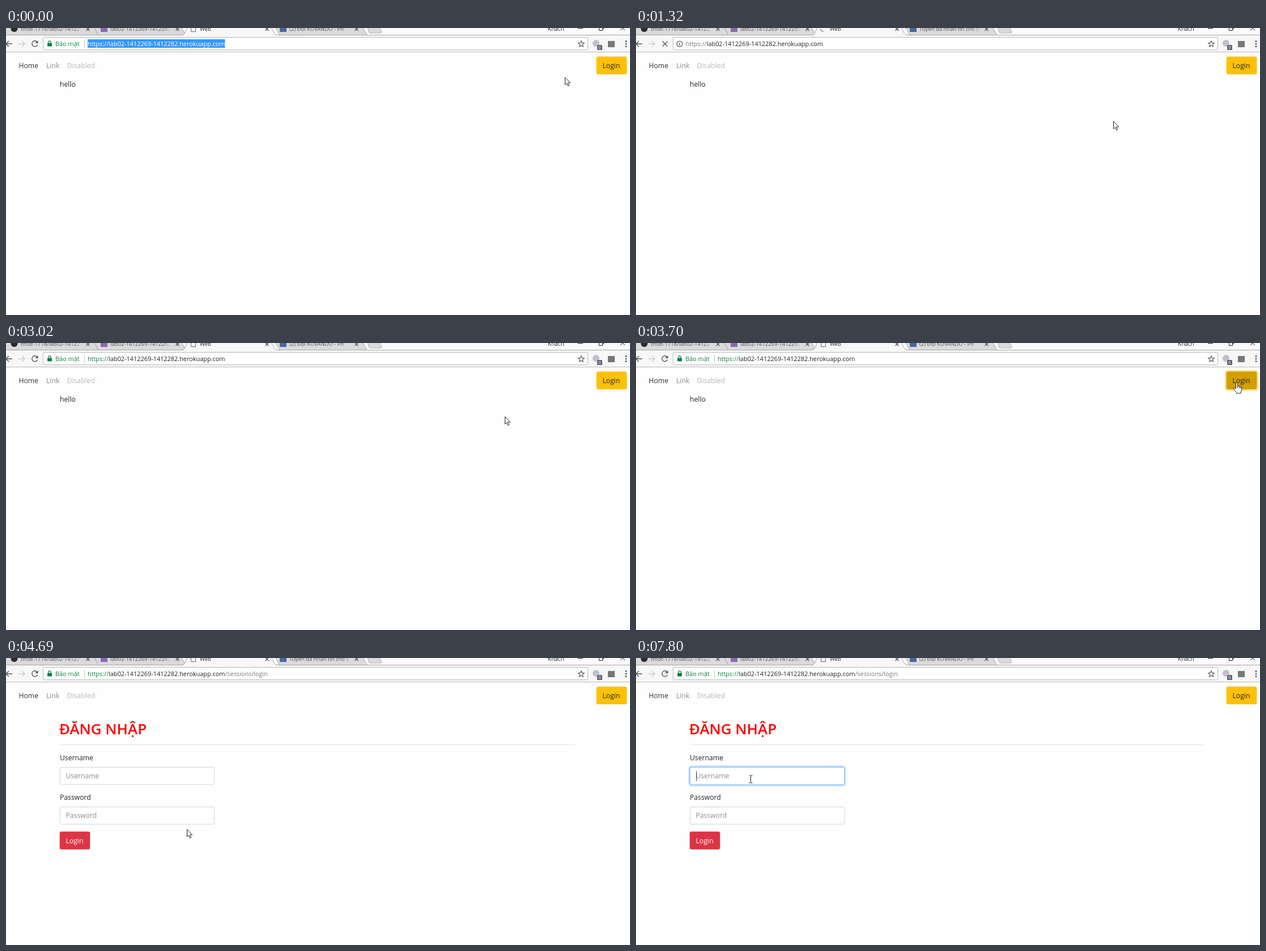
Write an HTML page that moves like this. It is 1101x508 px and loops after 8 s.

```html
<!DOCTYPE html>
<html lang="vi">
<head>
<meta charset="utf-8">
<title>Web</title>
<style>
  html, body { margin: 0; width: 100%; height: 100%; overflow: hidden; background: #fefefe; }
  svg { display: block; width: 1101px; height: 508px; }
  text { font-family: "Open Sans", "Noto Sans", sans-serif; font-size: 12.2px; fill: #212529; white-space: pre; }
  .tab text { font-size: 9.5px; fill: #555; }
  .tab.on text { fill: #222; }
  .bar text { font-size: 10.9px; fill: #222; }
  .bar .green { fill: #0b8043; }
  .bar .grey { fill: #777; }
  .bar .white { fill: #fff; }
  .line { fill: none; stroke: #555; stroke-width: 1.4; }
  .hint { fill: #868e96; }
  .field { fill: #fff; stroke: #ced4da; }
</style>
</head>
<body>
<svg viewBox="0 0 1101 508" xmlns="http://www.w3.org/2000/svg">
  <defs>
    <linearGradient id="fade"><stop stop-color="#dadada" stop-opacity="0"/><stop offset="1" stop-color="#dadada"/></linearGradient>
    <path id="x" d="M-3 -3L3 3M3 -3L-3 3" class="line"/>
    <path id="shape" d="M-8 -9H146L158 12.5H4Z" fill="#dadada" stroke="#a6a6a6"/>
  </defs>
  <rect width="1101" height="508" fill="#fefefe"/>

  <!-- tab strip -->
  <rect width="1101" height="13" fill="#fbfbfb"/>
  <path d="M638 -2H659L663 7Q663.500 9 661 9H643Q641 9 640 7Z" fill="#dadada" stroke="#b4b4b4"/>
  <g class="tab">
    <use href="#shape" x="479"/>
    <rect x="483" y="-5" width="12" height="12" fill="#4a66a0"/>
    <text id="chat" x="500" y="5"></text>
    <rect x="593" y="-4" width="16" height="13" fill="url(#fade)"/>
    <use href="#x" x="618.500" y="2"/>
    <use href="#shape" x="159"/>
    <rect x="167" y="-5" width="12" height="12" fill="#8a68b4"/>
    <text x="184" y="5">lab02-1412269-1412282</text>
    <rect x="276" y="-4" width="16" height="13" fill="url(#fade)"/>
    <use href="#x" x="302.500" y="2"/>
    <use href="#shape" x="5"/>
    <rect y="-5" width="12" height="17" fill="#dadada"/>
    <circle cx="14.500" cy="1" r="6" fill="#2b2b2b"/>
    <text x="26" y="5">tmdt-1718/lab02-14122</text>
    <rect x="120" y="-4" width="16" height="13" fill="url(#fade)"/>
    <use href="#x" x="144.500" y="2"/>
  </g>
  <path d="M0 12.500H1101" stroke="#a6a6a6"/>
  <rect y="13" width="1101" height="30" fill="#f7f7f7"/>
  <g class="tab on">
    <path d="M311 13Q314 12 315.500 9L320 -1H468L473 9Q475 12.500 479 13Z" fill="#f7f7f7"/>
    <path d="M309 12.500Q314 12 315.500 9L320 -1M468 -1L473 9Q475 12.500 480 12.500" fill="none" stroke="#a6a6a6"/>
    <path id="sheet" d="M326.500 -4V6.500H334.500V-4" fill="#fff" stroke="#666"/>
    <path id="spin" d="M-5 0A5 5 0 0 0 1 5" fill="none" stroke="#999" stroke-width="1.500"/>
    <text x="342" y="5">Web</text>
    <use href="#x" x="460.500" y="2"/>
  </g>
  <text x="956" y="5" style="font-size:10px">Khách</text>
  <path d="M1009 .5H1018M1046.500 -4V4.500H1052.500V-4M1052 1.500H1054.500V-3M1084 -4L1092 4M1092 -4L1084 4" fill="none" stroke="#222"/>

  <!-- toolbar -->
  <g class="bar">
    <path d="M0 42.500H1101" stroke="#b9b9b9"/>
    <path d="M11 28H0M5 23L0 28L5 33" class="line"/>
    <path d="M22 28H33M28 23L33 28L28 33" class="line" style="stroke:#ccc"/>
    <g id="reload">
      <path d="M54.800 24.700A5 5 0 1 0 55.500 29.500" class="line"/>
      <path d="M56.500 22V27H51.500Z" fill="#555"/>
    </g>
    <path id="stop" d="M46.500 23.500L55.500 32.500M55.500 23.500L46.500 32.500" class="line"/>
    <rect x="65.500" y="16.500" width="961" height="22" rx="2" fill="#fff" stroke="#b8b8b8"/>
    <g id="secure">
      <rect x="73" y="26.500" width="8" height="6" rx="1" fill="#0b8043"/>
      <path d="M74.800 27V25A2.200 2.200 0 0 1 79.200 25V27" fill="none" stroke="#0b8043" stroke-width="1.200"/>
      <text class="green" x="87" y="32">Bảo mật</text>
      <path d="M138.500 21V35" stroke="#c4c4c4"/>
    </g>
    <g id="info">
      <circle cx="77" cy="28" r="5" class="line" style="stroke-width:1.200"/>
      <path d="M77 27V31M77 24.700V26" stroke="#555" stroke-width="1.300"/>
    </g>
    <rect id="mark" x="144" y="20" width="242.500" height="15" fill="#3399ff"/>
    <text id="url" y="32"><tspan id="scheme">https://</tspan><tspan id="host">lab02-1412269-1412282.herokuapp.com</tspan><tspan id="path" class="grey">/sessions/login</tspan></text>
    <path d="M1015 22.800L1016.500 26.400L1020.300 26.700L1017.400 29.200L1018.300 33L1015 31L1011.700 33L1012.600 29.200L1009.700 26.700L1013.500 26.400Z" fill="none" stroke="#555" stroke-width="1.100"/>
    <circle cx="1041" cy="27" r="6" fill="#c0c0cc"/>
    <rect x="1043" y="30" width="9" height="9" rx="1.500" fill="#5f6475"/>
    <text class="white" x="1045.300" y="37.300" style="font-size:7.500px">0</text>
    <rect x="1062" y="23" width="12" height="11" fill="#777"/>
    <g fill="#555"><circle cx="1094" cy="23.500" r="1.400"/><circle cx="1094" cy="28" r="1.400"/><circle cx="1094" cy="32.500" r="1.400"/></g>
  </g>

  <!-- page -->
  <text x="22.500" y="71" fill-opacity=".95">Home</text>
  <text x="71" y="71" fill-opacity=".55">Link</text>
  <text x="107.500" y="71" fill-opacity=".32">Disabled</text>
  <rect id="glow" x="1040.500" y="49.500" width="56.500" height="34" rx="4" fill="none" stroke="#ffc107" stroke-opacity=".5" stroke-width="2.500"/>
  <rect id="login" x="1041.700" y="50.600" width="53.800" height="31.400" rx="3.200"/>
  <text x="1052.500" y="71">Login</text>
  <text id="hello" x="95" y="104">hello</text>
  <g id="form">
    <text x="94" y="135" style="font-size:25.900px;font-weight:600;fill:#f00">ĐĂNG NHẬP</text>
    <path d="M95 153.500H1004" stroke="#e5e5e5"/>
    <text x="95" y="181">Username</text>
    <rect id="ring" x="93.800" y="191.800" width="275.200" height="34" rx="4.500" fill="none" stroke="#007bff" stroke-opacity=".27" stroke-width="2.600"/>
    <rect id="user" class="field" x="95.300" y="193.400" width="272.300" height="30.500" rx="3"/>
    <text class="hint" x="105.500" y="213">Username</text>
    <rect id="caret" x="106" y="200" width="1" height="18" fill="#495057"/>
    <text x="95" y="251">Password</text>
    <rect class="field" x="95.300" y="263.600" width="272.300" height="30.500" rx="3"/>
    <text class="hint" x="105.500" y="283">Password</text>
    <rect x="94.700" y="307.300" width="53.600" height="31.400" rx="3.200" fill="#dc3545"/>
    <text x="105.500" y="328" style="fill:#fff">Login</text>
  </g>

  <!-- pointers -->
  <g id="pointer" stroke="#222" fill="#fff">
    <path id="arrow" d="M.5 .5V13.500L3.500 10.800L5.600 15.800L7.700 14.900L5.600 10H9.700Z"/>
    <path id="hand" d="M-1.500 10V1.500Q-1.500 0 0 0Q1.500 0 1.500 1.500V6Q3.500 4.800 4.300 6.600Q6 5.800 6.600 7.400Q8.500 7 8.500 9V13Q8.500 15 7 16.500V19H-.5V17.500Q-3.500 14.500 -5.500 11Q-6 9.300 -4.500 9.200Q-3 9.200 -1.500 11.500M1.500 6V10M4.300 6.600V10M6.600 7.400V10"/>
    <path id="beam" d="M-3 -6.500H-1Q0 -6.500 0 -5.500V5.500Q0 6.500 -1 6.500H-3M3 -6.500H1Q0 -6.500 0 -5.500M0 5.500Q0 6.500 1 6.500H3" fill="none"/>
  </g>
</svg>
<script>
const LOOP = 8000;
// The screen is refreshed only at these times.
const ticks = [
  0, 150, 270, 550, 680, 810, 940, 1070, 1200, 1320, 1470, 1590,
  1740, 1880, 2020, 2160, 2290, 2430, 2570, 2720,
  2870, 3000, 3140, 3280, 3420, 3560, 3700, 3820,
  3970, 4090, 4210, 4330, 4450, 4570, 4690, 4810, 4960,
  5120, 5260, 5400, 5540, 5970, 6470, 6870, 7020, 7550, 7800
];
// Pointer waypoints: time, x, y
const route = [
  [0, 986, 87], [270, 975, 88], [810, 975, 88], [1070, 922, 118], [1320, 842, 165],
  [1590, 762, 197], [1740, 743, 195], [2160, 743, 195], [2720, 800, 157],
  [3000, 880, 130], [3420, 1045, 79], [3560, 1060, 72], [3700, 1060, 70], [3970, 1060, 70],
  [4210, 880, 135], [4690, 319, 303], [4960, 233, 232], [5120, 212, 217], [5400, 202, 214], [8000, 202, 214]
];
const $ = id => document.getElementById(id);
const show = (id, on) => { $(id).style.display = on ? "" : "none"; };
const within = (t, from, to) => t >= from && t < to;
const inBox = ([x, y], l, t, r, b) => x >= l && x <= r && y >= t && y <= b;

function pointerAt(t) {
  const i = route.findIndex(p => p[0] > t);
  const [t0, x0, y0] = route[i - 1], [t1, x1, y1] = route[i];
  const k = (t - t0) / (t1 - t0);
  return [Math.round(x0 + (x1 - x0) * k), Math.round(y0 + (y1 - y0) * k)];
}

function draw(now) {
  const t = ticks.findLast(v => v <= now);
  const loading = within(t, 550, 1880);
  const selected = t < 550;
  const form = t >= 3970;
  const message = within(t, 1070, 2020) || within(t, 3970, 4960) || within(t, 6870, 7800);
  const pos = pointerAt(t);
  const overButton = inBox(pos, 1042, 51, 1095, 82);
  const overField = form && inBox(pos, 95, 193, 368, 224);
  const pressed = within(t, 3700, 3820);

  $("chat").textContent = message ? "Tuyền đã nhắn tin cho b" : "(2) Đội KUVANDO - Ph";
  show("spin", loading);
  show("sheet", !loading);
  $("spin").setAttribute("transform", `translate(330.5 1) rotate(${(t - 1320) * .36})`);
  show("stop", loading);
  show("reload", !loading);
  show("info", loading);
  show("secure", !loading);
  show("mark", selected);
  show("path", t >= 3820);
  $("url").setAttribute("x", loading ? 87.5 : 144);
  $("scheme").setAttribute("class", selected ? "white" : loading ? "grey" : "green");
  $("host").setAttribute("class", selected ? "white" : "");

  $("login").setAttribute("fill", pressed ? "#d39e00" : overButton ? "#e0a800" : "#ffc107");
  show("glow", within(t, 3700, 3970));
  show("hello", !form);
  show("form", form);
  const focused = t >= 5400;
  show("ring", focused);
  $("ring").style.opacity = t < 5540 ? .5 : 1;
  $("user").style.stroke = focused ? "#80bdff" : "";
  show("caret", focused && !within(t, 5970, 6470) && !within(t, 7020, 7550));

  show("hand", overButton);
  show("beam", overField);
  show("arrow", !overButton && !overField);
  const nudge = overField ? .5 : 0;
  $("pointer").setAttribute("transform", `translate(${pos[0] + nudge} ${pos[1] + nudge})`);
}

function loop() {
  draw(performance.now() % LOOP);
  requestAnimationFrame(loop);
}
loop();
</script>
</body>
</html>
```
